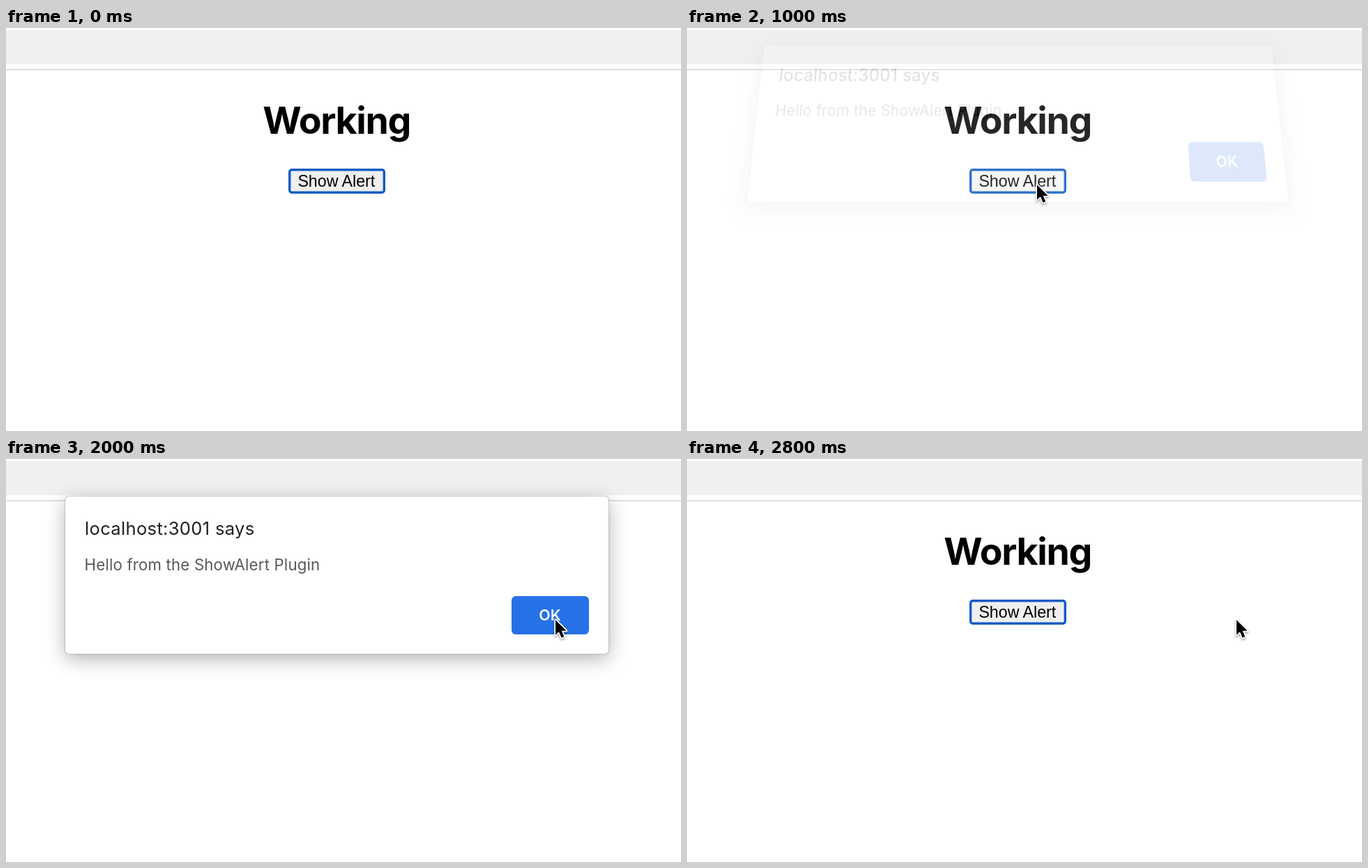
Animation of 968 by 579 pixels, one loop 3 s. Source, as an HTML page:

```html
<!DOCTYPE html>
<html lang="en">
<head>
<meta charset="utf-8">
<title>Show Alert</title>
<style>
  html, body { margin: 0; width: 100%; height: 100%; overflow: hidden; background: #fff; }
  svg { position: absolute; left: 0; top: 0; overflow: visible; }
  text { font-family: Inter, Roboto, sans-serif; }
  #dialog {
    position: absolute; left: 85px; top: 54px; width: 779px; height: 226px;
    border-radius: 5px; background: #fff; transform-origin: 50% 0;
    box-shadow: 0 0 1.5px rgba(0, 0, 0, .65), 0 7px 28px rgba(0, 0, 0, .3);
  }
  #dialog.opening {
    opacity: .15;
    transform: translateY(-30.2px) matrix3d(1,0,0,0, 0,1.006,0,-.000298, 0,0,1,0, 0,0,0,1.07);
  }
  #cursor { filter: drop-shadow(0 2px 1.5px rgba(0, 0, 0, .35)); }
</style>
</head>
<body>
<svg width="968" height="579">
  <rect y="3" width="968" height="49" fill="#eff0f2"/>
  <rect y="59" width="968" height="1.6" fill="#d5d7d9"/>
  <text x="474.1" y="152" text-anchor="middle" font-size="53.5" font-weight="700" letter-spacing="-.025em">Working</text>
  <rect x="406.75" y="203.75" width="135.5" height="32.5" rx="3" fill="#fff" stroke="#0f5bc4" stroke-width="3.5"/>
  <rect id="button" x="408.9" y="205.9" width="131.2" height="28.2" rx="1"/>
  <text x="473.8" y="228" text-anchor="middle" font-size="23.2" style="font-family: 'Liberation Sans', Arial, sans-serif">Show Alert</text>
</svg>

<div id="dialog">
  <svg width="779" height="226">
    <text x="28" y="55" font-size="25.6" letter-spacing=".3" fill="#202124">localhost:3001 says</text>
    <text x="27.6" y="106" font-size="22.2" letter-spacing=".19" fill="#55585c">Hello from the ShowAlert Plugin</text>
    <rect id="ok" x="640" y="143" width="111" height="55" rx="6"/>
    <text x="695" y="177.7" text-anchor="middle" font-size="21.3" font-weight="600" fill="#fff">OK</text>
  </svg>
</div>

<svg width="968" height="579">
  <path id="cursor" d="M0 0V21.5L4.9 17L8.6 25.6L12.3 24L8.7 15.6H15.6Z"
        stroke="#fff" stroke-width="3.4" stroke-linejoin="round" paint-order="stroke"/>
</svg>

<script>
const LOOP = 3000, STEP = 200;
const [button, dialog, ok, cursor] =
  ['button', 'dialog', 'ok', 'cursor'].map(id => document.getElementById(id));

// Each entry holds from its start time (ms) until the next one.
const pointer = [
  [0, null], [200, [589, 285]], [400, [476, 175]], [600, [501.5, 241]],
  [800, [502, 225.3]], [1600, [782, 235]], [1800, [788, 231.2]]
];
const buttonFill = [[0, '#efefef'], [800, '#e2e2e2'], [1000, '#f5f5f5'], [1200, '#efefef']];
const okFill = [[0, '#1a68e4'], [1800, '#2671e8']];
const dialogState = [[0, 'closed'], [1000, 'opening'], [1200, 'open'], [2600, 'closed']];

const valueAt = (track, time) => track.findLast(([start]) => start <= time)[1];

function draw(now) {
  const time = Math.floor(now % LOOP / STEP) * STEP;
  const tip = valueAt(pointer, time);
  const state = valueAt(dialogState, time);

  cursor.style.display = tip ? '' : 'none';
  if (tip) cursor.setAttribute('transform', `translate(${tip})`);
  button.setAttribute('fill', valueAt(buttonFill, time));
  ok.setAttribute('fill', valueAt(okFill, time));
  dialog.className = state;
  dialog.style.display = state === 'closed' ? 'none' : '';
}

let origin;
function tick(now) {
  origin ??= now;
  draw(now - origin);
  requestAnimationFrame(tick);
}
draw(0);
requestAnimationFrame(tick);
</script>
</body>
</html>
```
